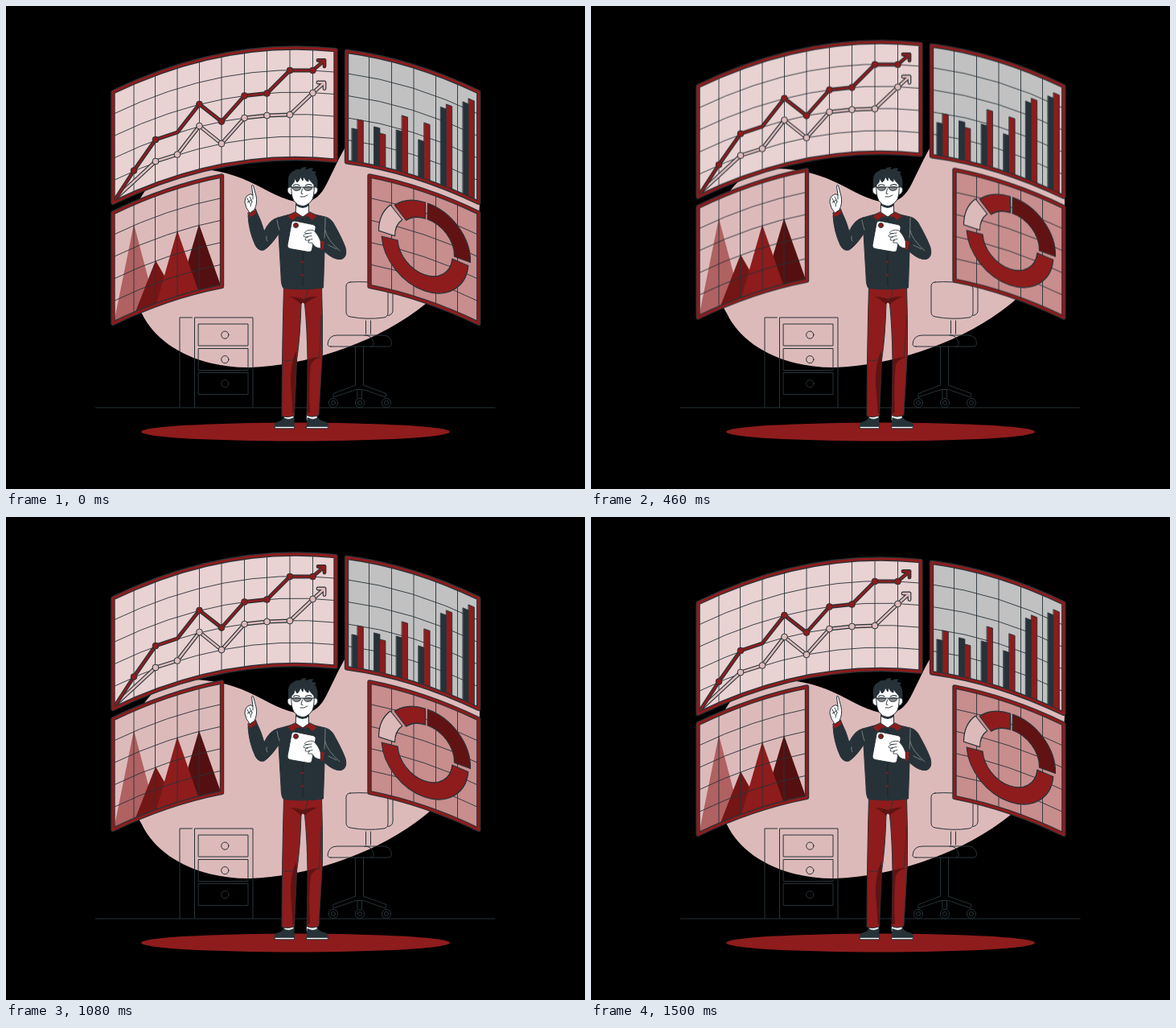
An HTML page that plays this animation: 720x600 px, repeating every 1540 ms.

```html
<!DOCTYPE html>
<html lang="en">
<head>
<meta charset="utf-8">
<title>Floating dashboards</title>
<style>
  html, body { margin: 0; width: 100%; height: 100%; overflow: hidden; background: #000; }
  svg { display: block; width: 720px; height: 600px; }
  .line { fill: none; stroke: #263238; stroke-linecap: round; stroke-linejoin: round; }
  .ink { stroke: #263238; stroke-linejoin: round; stroke-linecap: round; }
  .red { fill: #8e1c1c; }
  .dark { fill: #263238; }
  .deep { fill: #5f1313; }
  .white { fill: #fff; }
  .pale { fill: none; stroke: #8b9295; stroke-width: .8; stroke-linecap: round; }
  .seam { fill: none; stroke: #1a2327; }
</style>
</head>
<body>
<svg viewBox="0 0 720 600">
  <path fill="#ddbaba" d="M421 177C410 196 404 212 396 226C388 240 376 246 361 243.500C336 238 318 224 293 214C264 203 227 198 203 206C170 218 150 262 150 310C150 338 158 364 169 382C188 422 240 450 304 449C376 447 465 417 523 369C566 333 589 290 589 243C589 190 560 140 505 137C465 137 438 148 421 177Z"/>

  <path class="line" stroke-width="1.200" d="M111.500 499H608"/>
  <g id="cabinet" class="line">
    <path d="M231.500 387H216V498.500M234.500 498.500V387H307V498.500"/>
  </g>
  <g id="chair" class="line">
    <path d="M428 343Q450 341.500 470 345.500Q475 347 475 352V381Q475 386 470 387Q449 390 428 386Q423 385 423 380V348Q423 343.500 428 343Z"/>
    <path d="M470 345.500H476Q481 347 481 353V379Q480 384 475 384.500M447.500 391V407M453.500 391V407"/>
    <path d="M404 423H454Q458 423 457 418Q455 409 446 409H412Q401 409 400 420Q400 423 404 423ZM446 409H470Q479 410 479.500 419Q479.500 423 475 423H454"/>
    <path d="M434.500 423V471M444.500 423V471M434.500 471L407 481.500V486L435 476.500H444.500L472 486L473 481.500L444.500 471M437 477V487M442.500 477V487"/>
  </g>

  <ellipse class="red" cx="360" cy="529" rx="192" ry="11.500"/>

  <g id="panels"></g>

  <g id="person">
    <!-- shoes -->
    <g class="ink">
      <path class="white" d="M346 508H358V515H346ZM374 508H387V515H374Z"/>
      <path class="dark" d="M345.500 512Q352 515 357.500 511.500L358.500 523H334.500Q333 520 336 517.500Q343 516 345.500 512ZM387.500 512Q381 515 375 511.500L374 523H400.500Q401.500 520 398.500 517.500Q391 516 387.500 512Z"/>
      <path class="white" d="M334 522.300H358.500V524.800H335ZM374 522.300H400.500L400 524.800H374Z"/>
    </g>
    <!-- trousers -->
    <path class="red ink" d="M345.500 348H392.500Q394 390 393.500 430L389 508Q381 512 374 508.500Q375 470 375 440Q374.500 400 371.500 370Q369 366 367 370Q366 410 361.500 440Q360 475 358.500 509Q350 512 343 509.500Q343 440 345.500 348Z"/>
    <path class="deep" d="M353 361Q361 361 370 364Q380 360 387 361Q376 366 371.500 371Q369 365 367 371Q360 364 353 361ZM361 428Q353 445 354 470Q356 490 356.500 506L358 506Q360 470 361.500 438ZM375 439Q385 436 390 436Q381 440 379 446Q376 470 378 505L374.500 506Q375 470 375 439Z"/>
    <path class="line" stroke-width=".8" d="M375 351Q375 360 370 365M346 440Q353 442 359 438M392 385Q391 420 389 438"/>
    <!-- arms and jacket -->
    <path class="dark ink" d="M338 263Q348 260 361 257L376 257Q388 260 397 262Q405 264 409 273Q418 289 422 300Q425 312 417 314.500Q408 316 396 305L394.500 350Q369 353.500 345 350.500Q342 347 342 335L339 283Q329 298 321 303Q314 305 310 297Q302 280 301 260L311 254Q318 268 321 280Q328 265 338 263Z"/>
    <path class="pale" d="M337 266Q338 273 340 278M324 286Q323 290 325 292M397 263Q397 276 396 288M397 279Q399 290 415 304M401 297L411 302"/>
    <path class="red ink" d="M301 257L310.500 252L312 258L303 263Z"/>
    <!-- pointing hand -->
    <path class="white ink" d="M303 257Q298 251 297 244Q297 237 301 235Q304 232 307 235L305.500 224Q306 221 307.500 223L311 236Q313 245 309 253Z"/>
    <path class="line" stroke-width=".9" d="M300 239L303 245M303 237L306 243M307 235V240M300 244L305 241M306 243Q304 246 304 249"/>
    <!-- neck and collar -->
    <path class="white ink" d="M361 244H376.500V259L369 263L360.500 259Z"/>
    <path class="dark" d="M361 245Q369 251 376.500 244V248Q369 254 361 248Z"/>
    <path class="red ink" d="M360 256L369 262L362 262L356 267L350 261ZM377.500 256L369 262L376 262L381 266.500L387 261Z"/>
    <path class="seam" d="M369 263V348"/>
    <circle class="red" cx="368.500" cy="318" r="1.300"/>
    <circle class="red" cx="368.500" cy="334.500" r="1.300"/>
    <!-- head -->
    <path class="dark" d="M353 232Q350 224 351 214Q352 207 358 205Q360 202 366 203Q367 200 374 200Q371 202 374 203Q378 200 383 202Q380 203 381 205Q385 205 386 207L384 208Q389 215 387 226L384 233Z"/>
    <path class="white ink" d="M355 225Q351 224 350 228Q350 234 355.500 234.500ZM383 225Q387 224 387.500 228Q387.500 234 382 234.500Z"/>
    <path class="white ink" d="M355 222Q359 220 359 214L362 219Q365 217 366 212L369 217L370 212Q373 218 376 218L376 214Q379 218 383 222Q384 238 379 243Q373 249 368 248.500Q362 248 358 242Q354 235 355 222Z"/>
    <path class="line" stroke-width="1.200" d="M357.500 223Q361 220.500 365 223M372.500 223Q376 220.500 380 222.500"/>
    <path class="ink" fill="#858585" stroke-width=".8" d="M356 225.500Q361 223 367 225.500Q366 229.500 361.500 229.500Q357 229.500 356 225.500ZM370 225.500Q376 223 381 225.500Q380 229.500 375.500 229.500Q371 229.500 370 225.500Z"/>
    <path class="line" stroke-width=".9" d="M355 225L383 225M368.500 227L367 233L369 233.500M366 237Q371 238 375 235"/>
    <!-- tablet and holding hand -->
    <path class="white ink" d="M359.500 267L381.500 271.500Q385.500 272.500 385 276L380.500 303Q379.500 306 376 305.500L353 301.500Q349.500 300.500 350 297L355 270Q356 266.500 359.500 267Z"/>
    <circle class="red ink" cx="360.500" cy="272.500" r="3"/>
    <path class="red ink" d="M391 291L396.500 292L394.500 304L390 302Z"/>
    <path class="white ink" stroke-width=".8" d="M391 292Q388 283 382 278.500Q375 277.500 371.500 281Q371 283 376 282.500Q370 283 370 286Q371 288 376 286.500Q371 288 372 290.500Q374 292 378 290.500Q375 292 376 294Q379 294 381 294.500Q384 301 391 301Z"/>
    <path class="line" stroke-width=".8" d="M375 282.500L380 282M375 286.500L380 285.500M377 290.500L381 289.500"/>
  </g>
</svg>
<script>
const NS = 'http://www.w3.org/2000/svg';
const INK = '#263238', RED = '#8e1c1c', ROW = 27.5;
const panels = document.getElementById('panels');

function add(parent, tag, attrs) {
  const el = document.createElementNS(NS, tag);
  for (const k in attrs) el.setAttribute(k, attrs[k]);
  return parent.appendChild(el);
}
const shape = (g, d, fill, stroke = 'none', width = 1) =>
  add(g, 'path', { d, fill, stroke, 'stroke-width': width, 'stroke-linejoin': 'round', 'stroke-linecap': 'round' });
const dot = (g, cx, cy, r, fill) =>
  add(g, 'circle', { cx, cy, r, fill, stroke: INK, 'stroke-width': 1 });
const poly = pts => 'M' + pts.map(p => p.join(' ')).join('L');

// All screens share one parabola around MID; bend(a, a) is its height at a,
// bend(a, b) the Bezier control between a and b.
const MID = 360.4, BOW = 0.001062;
const bend = (a, b) => BOW * (a - MID) * (b - MID);

function screen({ x0, x1, top, fill, cols, chart, gridOnTop }) {
  const mid = (x0 + x1) / 2, h = ROW * 5;
  const y0 = top + bend(x0, x0), y1 = top + bend(x1, x1), cy = top + bend(x0, x1);
  const edge = d => `M${x0} ${y0 + d}Q${mid} ${cy + d} ${x1} ${y1 + d}`;
  const outline = `${edge(0)}V${y1 + h}Q${mid} ${cy + h} ${x0} ${y0 + h}Z`;
  const id = 'clip' + panels.childElementCount;
  const g = add(panels, 'g', {});
  shape(add(g, 'clipPath', { id }), outline, '#000');
  shape(g, outline, fill);
  const inner = add(g, 'g', { 'clip-path': `url(#${id})` });
  const grid = () => {
    const rows = [1, 2, 3, 4].map(i => edge(i * ROW)).join('');
    const lines = cols.map(x => `M${x} 0V420`).join('');
    shape(inner, rows + lines, 'none', INK, 0.9);
  };
  if (!gridOnTop) grid();
  chart(inner);
  if (gridOnTop) grid();
  shape(g, outline, 'none', INK, 5.4);
  shape(g, outline, 'none', RED, 3.2);
}

function trend(g, pts, tip, color, marks) {
  const [x, y] = tip;
  const d = poly([...pts, tip]) + poly([[x - 8, y], tip, [x, y + 7.5]]);
  shape(g, d, 'none', INK, 4.8);
  shape(g, d, 'none', color, 2.5);
  marks.forEach(i => dot(g, ...pts[i], 3.9, color));
}

function trends(g) {
  const xs = [159, 186, 213, 240.5, 268, 296.5, 324.5, 353, 381.5];
  const join = ys => ys.map((y, i) => [xs[i], y]);
  trend(g, [[135, 240], ...join([218, 193, 184.5, 149, 171, 139, 136, 135, 108])],
    [396, 95], '#ddbaba', [2, 3, 4, 5, 6, 7, 8, 9]);
  trend(g, [[134, 243], ...join([204.5, 166, 157, 122, 143.5, 111.5, 108.5, 80, 80])],
    [396, 67.5], RED, [1, 2, 4, 5, 6, 7, 8, 9]);
}

function bars(g) {
  const tops = [[152, 141], [150, 158], [154, 136], [166, 145], [125.5, 122], [119, 115]];
  tops.forEach((pair, i) => pair.forEach((y, j) => {
    const x = 430.3 + i * 27.6 + j * 7;
    const lean = 1.5 + i * 0.3;
    shape(g, `M${x} ${y}l7 ${lean}V260H${x}Z`, j ? RED : INK, INK, 0.9);
  }));
}

function peaks(g) {
  [
    ['#b06161', [134, 394], [159, 271], [186, 373]],
    ['#741616', [159, 385], [186, 316], [213, 363]],
    ['#541010', [213, 363], [240, 271], [268, 350]],
    [RED, [186, 373], [213, 279], [240, 356]]
  ].forEach(([color, ...pts]) => shape(g, poly(pts) + 'Z', color));
}

function ring(g) {
  const skew = add(g, 'g', { transform: 'matrix(1 .33 0 1 521 300)' });
  const arc = (a0, a1, color, dx, dy) => {
    const at = (a, r) => {
      const t = a * Math.PI / 180;
      return `${dx + r * Math.sin(t)} ${dy - r * Math.cos(t)}`;
    };
    const big = +(a1 - a0 > 180);
    shape(skew, `M${at(a0, 54)}A54 54 0 ${big} 1 ${at(a1, 54)}L${at(a1, 34)}A34 34 0 ${big} 0 ${at(a0, 34)}Z`, color, INK, 1.2);
  };
  arc(95, 266, RED, 0, 0);
  arc(270, 313, '#ddbaba', -3.5, -2);
  arc(315, 360, RED, 0.5, -2);
  arc(1, 92, '#611313', 2.5, -2);
}

screen({ x0: 133, x1: 268.5, top: 202, fill: '#ddbaba',
  cols: [159, 185.5, 213, 240], chart: peaks, gridOnTop: true });
screen({ x0: 452, x1: 587.8, top: 202, fill: '#c88d8d',
  cols: [479.5, 507, 534.5, 561.5], chart: ring });
screen({ x0: 133, x1: 410, top: 52, fill: '#e8d2d2',
  cols: [159, 185.5, 213, 240.5, 268, 296.5, 324.5, 353, 381.5], chart: trends });
screen({ x0: 423.5, x1: 587.8, top: 52, fill: '#c1c1c1',
  cols: [451.5, 479.5, 507, 534.5, 561.5], chart: bars });

const cabinet = document.getElementById('cabinet');
[395, 425.5, 455.5].forEach(y => {
  add(cabinet, 'rect', { x: 239.5, y, width: 61.5, height: 27 });
  add(cabinet, 'circle', { cx: 272.3, cy: y + 13.6, r: 4.6 });
});
const chair = document.getElementById('chair');
[407, 440, 473].forEach(cx => [5.6, 2.6].forEach(r =>
  add(chair, 'circle', { cx, cy: 493, r })));

// Linear float, 12px up and back every 1500 ms, shown at 24 steps a second.
const LOOP = 1540, FPS = 24, RISE = 12, HALF = 750;
const lift = ms => RISE * (1 - Math.abs((ms + 20) % (2 * HALF) - HALF) / HALF);
const frames = Array.from({ length: 37 }, (_, i) => ({
  offset: Math.round(i * 100 / FPS) * 10 / LOOP,
  transform: `translateY(${0.32 - lift(i * 1000 / FPS)}px)`,
  easing: 'step-end'
}));
frames.push({ ...frames[36], offset: 1 });
panels.animate(frames, { duration: LOOP, iterations: Infinity });
</script>
</body>
</html>
```
